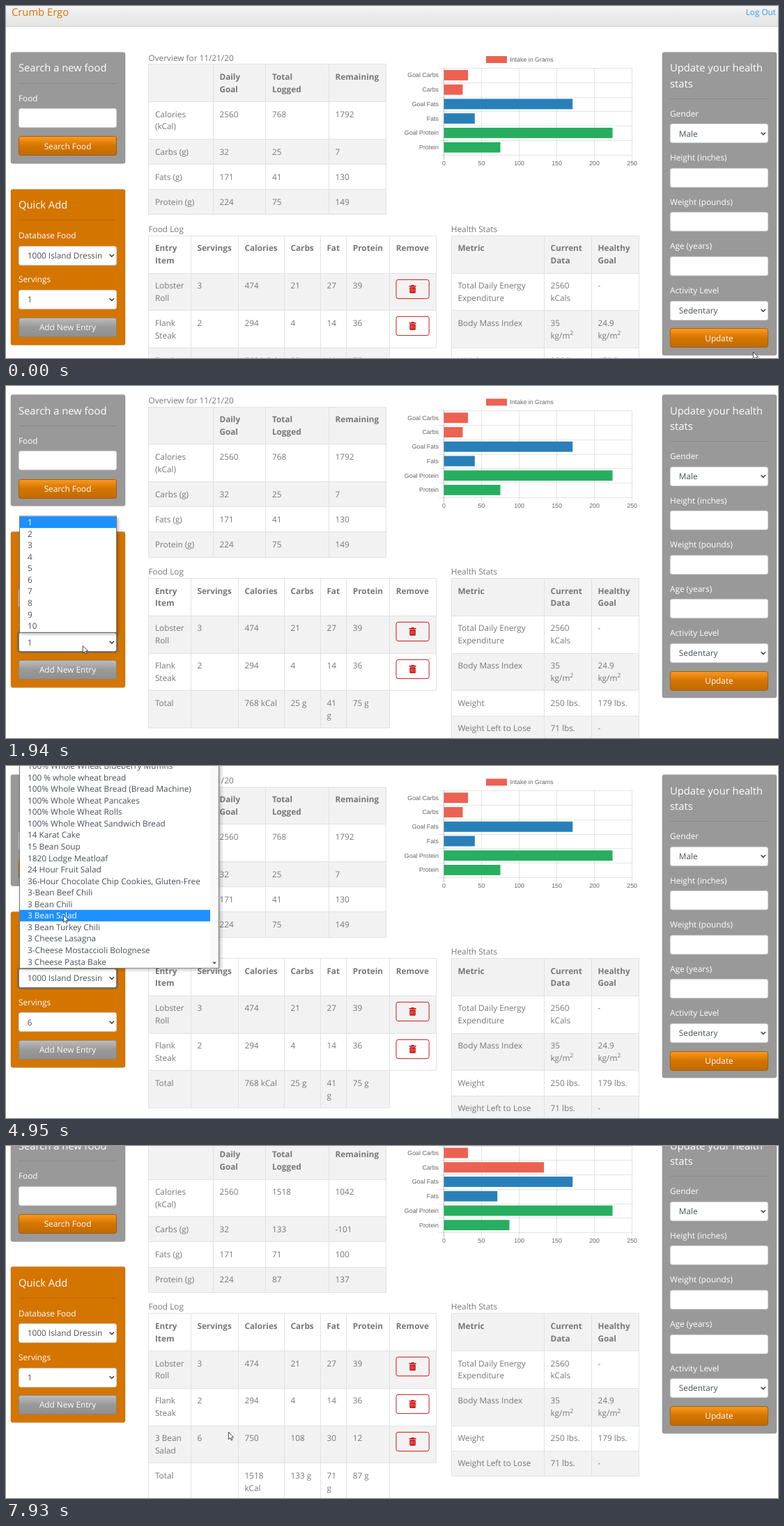
Write an HTML page with a canvas that moves like this. It is 1108 by 506 pixels and loops after 8 s.

```html
<!DOCTYPE html>
<html lang="en">
<head>
<meta charset="utf-8">
<title>Food log</title>
<style>
html, body { margin: 0; width: 100%; height: 100%; overflow: hidden; background: #fff; }
canvas { display: block; width: 1108px; height: 506px; }
</style>
</head>
<body>
<canvas id="stage"></canvas>
<script>
const W = 1108, H = 506, LOOP = 8000;
const canvas = document.getElementById('stage');
const dpr = window.devicePixelRatio || 1;
canvas.width = W * dpr;
canvas.height = H * dpr;
const ctx = canvas.getContext('2d', { alpha: false });

const SANS = '"Open Sans", sans-serif', ARIAL = '"Liberation Sans", Arial, sans-serif';
const BASE = 11.8, TITLE = 14.75, LINE = 17.7, ROW = 16.56;
const GRAY = '#999999', ORANGE = '#d47500', BODY = '#777', FIELD = '#495057';

// Moments of the story, in ms
const T = { servOpen: 1940, servPick: 2450, foodOpen: 3400, foodPick: 5180, add: 5780, load: 6900, grow: 6920 };

// Pointer path: time, x, y
const PATH = [
  [70, 1072, 497], [150, 1086, 500], [820, 142, 360], [900, 142, 360], [1140, 109, 370],
  [1600, 112, 384], [1830, 112, 384], [1920, 110, 374], [2290, 100, 280], [2440, 100, 280],
  [2770, 115, 422], [2910, 116, 434], [3000, 116, 434], [3350, 108, 308], [3450, 108, 308],
  [3690, 102, 288], [3780, 102, 288], [4010, 98, 238], [4320, 98, 238], [4390, 98, 224],
  [4560, 97, 222], [4710, 88, 200], [4880, 87, 201], [4950, 82, 214], [5180, 82, 214],
  [5590, 112, 385], [5740, 114, 404], [5820, 114, 404], [6290, 326, 425], [6520, 380, 405],
  [6590, 380, 405], [7320, 342, 316], [7390, 342, 315], [7500, 342, 315], [7930, 319, 411]
];

const FOODS = [
  '100% Whole Wheat Blueberry Muffins', '100 % whole wheat bread',
  '100% Whole Wheat Bread (Bread Machine)', '100% Whole Wheat Pancakes',
  '100% Whole Wheat Rolls', '100% Whole Wheat Sandwich Bread', '14 Karat Cake',
  '15 Bean Soup', '1820 Lodge Meatloaf', '24 Hour Fruit Salad',
  '36-Hour Chocolate Chip Cookies, Gluten-Free', '3-Bean Beef Chili', '3 Bean Chili',
  '3 Bean Salad', '3 Bean Turkey Chili', '3 Cheese Lasagna',
  '3-Cheese Mostaccioli Bolognese', '3 Cheese Pasta Bake'
];
const COUNTS = Array.from({ length: 10 }, (_, i) => String(i + 1));

let scroll = 0;

const clamp = (v) => Math.max(0, Math.min(1, v));
const smooth = (t, a, b) => { const k = clamp((t - a) / (b - a)); return k * k * (3 - 2 * k); };
const snap = (y) => Math.round(y - scroll) + scroll;

function pointer(t) {
  if (t <= PATH[0][0]) return PATH[0].slice(1);
  for (let i = 1; i < PATH.length; i++) {
    const [t0, x0, y0] = PATH[i - 1], [t1, x1, y1] = PATH[i];
    if (t <= t1) {
      const k = smooth(t, t0, t1);
      return [x0 + (x1 - x0) * k, y0 + (y1 - y0) * k];
    }
  }
  return PATH[PATH.length - 1].slice(1);
}

function scrollAt(t) {
  if (t < T.load) return 53.7 * smooth(t, 930, 1350);
  return 89.5 * smooth(t, 7470, 7930);
}

function text(s, x, y, color, size = BASE, weight = 400, align = 'left', family = SANS) {
  ctx.font = `${weight} ${size}px ${family}`;
  ctx.textAlign = align;
  ctx.fillStyle = color;
  ctx.fillText(s, x, y);
}

function rect(x, y, w, h, color) {
  ctx.fillStyle = color;
  ctx.fillRect(x, y, w, h);
}

function box(x, y, w, h, fill, border, r = 3) {
  y = snap(y);
  ctx.beginPath();
  ctx.roundRect(x + .4, y + .4, w - .8, h - .8, r);
  if (fill) { ctx.fillStyle = fill; ctx.fill(); }
  if (border) { ctx.strokeStyle = border; ctx.lineWidth = .9; ctx.stroke(); }
}

function ring(x, y, w, h, color) {
  ctx.beginPath();
  ctx.roundRect(x - 1, snap(y) - 1, w + 2, h + 2, 4);
  ctx.strokeStyle = color;
  ctx.lineWidth = 2.2;
  ctx.stroke();
}

function polyline(points, color, width) {
  ctx.beginPath();
  points.forEach(([x, y]) => ctx.lineTo(x, y));
  ctx.strokeStyle = color;
  ctx.lineWidth = width;
  ctx.stroke();
}

// ---- page parts ----

function header() {
  const g = ctx.createLinearGradient(0, -12, 0, 29);
  g.addColorStop(0, '#fff');
  g.addColorStop(.5, '#eee');
  g.addColorStop(1, '#e4e4e4');
  rect(0, -12, W, 41, g);
  rect(0, snap(29), W, 1, '#d5d5d5');
  text('Crumb Ergo', 8, 14.3, ORANGE, TITLE);
  text('Log Out', 1105, 13.2, '#3399f3', BASE, 400, 'right');
}

function card(x, y, h, color, titles) {
  box(x - 11.5, y, 165, h, color, 'rgba(0,0,0,.125)');
  titles.forEach((s, i) => text(s, x, y + 28.4 + i * 22.1, '#fff', TITLE));
  rect(x, snap(y + 44.6 + (titles.length - 1) * 22.1), 141, 1, 'rgba(0,0,0,.1)');
}

function field(label, x, y, value, focus) {
  text(label, x, y - 10.6, '#fff');
  box(x, y, 141, 28, '#fff', focus ? '#6f6f6f' : '#ced4da');
  if (focus) ring(x, y, 141, 28, 'rgba(68,90,115,.5)');
  if (!value) return;
  ctx.save();
  ctx.beginPath();
  ctx.rect(x, y, 119.8, 28);
  ctx.clip();
  text(value, x + 12.8, y + 18.3, FIELD);
  ctx.restore();
  const cy = y + 14;
  polyline([[x + 130.6, cy - 1.6], [x + 133.8, cy + 1.6], [x + 137, cy - 1.6]], '#333', 1.4);
}

function button(label, x, y, [top, mid, low, edge], focus) {
  const g = ctx.createLinearGradient(0, y, 0, y + 28);
  g.addColorStop(0, top);
  g.addColorStop(.5, mid);
  g.addColorStop(1, low);
  box(x, y, 141, 28, g, edge);
  if (focus) ring(x, y, 141, 28, 'rgba(153,153,153,.65)');
  text(label, x + 70.5, y + 18.3, '#fff', BASE, 400, 'center');
}
const HOT = ['#ff9b21', ORANGE, '#c06a00', '#a15900'];
const COOL = ['#bfbfbf', GRAY, '#8f8f8f', '#858585'];

function trash(x, y) {
  const red = '#cd0200', cx = x + 24, cy = snap(y) + 14;
  box(x, y, 48, 28, null, red);
  rect(cx - 2, cy - 5.9, 4, 1.2, red);
  rect(cx - 5, cy - 5, 10, 1.5, red);
  ctx.beginPath();
  ctx.roundRect(cx - 4.2, cy - 2.8, 8.4, 8.6, 1);
  ctx.fillStyle = red;
  ctx.fill();
  for (const dx of [-2.3, 0, 2.3]) rect(cx + dx - .35, cy - 1.4, .7, 5.6, '#f4c9c8');
}

function table(xs, y, rows, shaded) {
  const line = '#dfe2e5';
  rows.forEach((cells, r) => {
    const lines = Math.max(...cells.map((c) => c.split('\n').length));
    const h = lines > 1 ? 53.8 : 36.1;
    const top = snap(y), bottom = snap(y + h), right = xs[cells.length];
    if (r % 2 === shaded) rect(xs[0], top, right - xs[0], bottom - top, '#f2f2f2');
    rect(xs[0], top, right - xs[0], 1, line);
    rect(xs[0], bottom, right - xs[0] + 1, 1, line);
    for (let i = 0; i <= cells.length; i++) rect(Math.round(xs[i] - .4), top, 1, bottom - top, line);
    cells.forEach((cell, i) => {
      const x = xs[i] + 9.4;
      if (cell === 'trash') return trash(x - .2, y + 9);
      cell.split('\n').forEach((s, n) => {
        const [main, sup] = s.split('^');
        const by = y + 22.6 + n * LINE;
        text(main, x, by, BODY, BASE, r ? 400 : 700);
        if (sup) text(sup, x + ctx.measureText(main).width, by - 4.5, BODY, 8.85);
      });
    });
    y += h;
  });
}

function chart(values, grow) {
  const x0 = 628.5, y0 = 89, unit = 1.0804, step = 20.75;
  const names = ['Goal Carbs', 'Carbs', 'Goal Fats', 'Fats', 'Goal Protein', 'Protein'];
  const colors = ['#eb6252', '#2980b9', '#27ae60'];
  const grid = 'rgba(0,0,0,.1)';
  rect(689, 72, 30, 10, colors[0]);
  text('Intake in Grams', 723.2, 80, '#666', 8.85, 400, 'left', ARIAL);
  for (let i = 0; i <= 6; i++) rect(621, snap(y0 + i * step), 278, 1, grid);
  for (let i = 0; i <= 5; i++) {
    const x = x0 + i * 50 * unit;
    rect(Math.round(x - .5), y0, 1, 132, i ? grid : 'rgba(0,0,0,.25)');
    text(String(i * 50), x, 228.8, '#666', 8.85, 400, 'center', ARIAL);
  }
  names.forEach((s, i) => {
    const cy = y0 + (i + .5) * step;
    text(s, 621, cy + 3, '#666', 8.85, 400, 'right', ARIAL);
    rect(x0, cy - 7.4, values[i] * unit * grow, 14.9, colors[i >> 1]);
  });
}

function page(t) {
  const fresh = t >= T.load;
  header();

  card(18, 66, 161, GRAY, ['Search a new food']);
  field('Food', 18, 147.2);
  button('Search Food', 18, 187.2, HOT);

  const food = !fresh && t >= T.foodPick ? '3 Bean Salad' : '1000 Island Dressing';
  const count = !fresh && t >= T.servPick ? '6' : '1';
  card(18, 262.6, 225, ORANGE, ['Quick Add']);
  field('Database Food', 18, 344.6, food, t >= T.foodOpen - 20 && t < T.add);
  field('Servings', 18, 408, count, t >= T.servOpen - 10 && t < T.foodOpen - 20);
  button('Add New Entry', 18, 447.6, COOL, t >= T.add && !fresh);

  card(953, 66, 436.6, GRAY, ['Update your health', 'stats']);
  field('Gender', 953, 169.3, 'Male');
  field('Height (inches)', 953, 232.9);
  field('Weight (pounds)', 953, 296.4);
  field('Age (years)', 953, 360);
  field('Activity Level', 953, 423.6, 'Sedentary');
  button('Update', 953, 463.3, HOT);

  const sums = fresh
    ? [['1518', '1042'], ['133', '-101'], ['71', '100'], ['87', '137']]
    : [['768', '1792'], ['25', '7'], ['41', '130'], ['75', '149']];
  text('Overview for 11/21/20', 204.5, 78.7, BODY);
  table([204.5, 297, 372.5, 463, 545], 83.3, [
    ['', 'Daily\nGoal', 'Total\nLogged', 'Remaining'],
    ['Calories\n(kCal)', '2560', ...sums[0]],
    ['Carbs (g)', '32', ...sums[1]],
    ['Fats (g)', '171', ...sums[2]],
    ['Protein (g)', '224', ...sums[3]]
  ], 0);

  const log = [
    ['Entry\nItem', 'Servings', 'Calories', 'Carbs', 'Fat', 'Protein', 'Remove'],
    ['Lobster\nRoll', '3', '474', '21', '27', '39', 'trash'],
    ['Flank\nSteak', '2', '294', '4', '14', '36', 'trash']
  ];
  if (fresh) {
    log.push(['3 Bean\nSalad', '6', '750', '108', '30', '12', 'trash'],
      ['Total', '', '1518\nkCal', '133 g', '71\ng', '87 g']);
  } else {
    log.push(['Total', '', '768 kCal', '25 g', '41\ng', '75 g']);
  }
  text('Food Log', 204.5, 324.7, BODY);
  table([204.5, 265, 333, 399, 451, 488.4, 550.4, 617], 329.7, log, 1);

  text('Health Stats', 638.8, 324.7, BODY);
  table([639, 772, 840, 908], 329.7, [
    ['Metric', 'Current\nData', 'Healthy\nGoal'],
    ['Total Daily Energy\nExpenditure', '2560\nkCals', '-'],
    ['Body Mass Index', '35\nkg/m^2', '24.9\nkg/m^2'],
    ['Weight', '250 lbs.', '179 lbs.'],
    ['Weight Left to Lose', '71 lbs.', '-']
  ], 0);

  const grow = fresh ? 1 - Math.pow(1 - clamp((t - T.grow) / 1000), 4) : 1;
  chart(fresh ? [32, 133, 171, 71, 224, 87] : [32, 25, 171, 41, 224, 75], grow);
}

// ---- overlays ----

function dropdown(items, y, width, inner, cy, chosen) {
  const h = items.length * ROW;
  ctx.save();
  ctx.shadowColor = 'rgba(0,0,0,.3)';
  ctx.shadowBlur = 5;
  ctx.shadowOffsetX = ctx.shadowOffsetY = 2;
  rect(19, y - 1, width, h + 2.4, '#767676');
  ctx.restore();
  rect(20, y, width - 2, h + .6, '#fff');
  const over = Math.floor((cy - y) / ROW);
  const active = over >= 0 && over < items.length ? over : chosen;
  items.forEach((s, i) => {
    const top = y + i * ROW;
    if (i === active) rect(20, top, inner, ROW, '#1e90ff');
    text(s, 31, top + 12.5, i === active ? '#fff' : FIELD);
  });
}

function foodList(cy) {
  dropdown(FOODS, 206.8 - 13 * ROW, 287, 273, cy, -1);
  rect(293, 0, 12, 290, '#fafafa');
  ctx.beginPath();
  ctx.moveTo(296.4, 281.8);
  ctx.lineTo(301.8, 281.8);
  ctx.lineTo(299.1, 285);
  ctx.fillStyle = '#505050';
  ctx.fill();
}

function statusBar(t) {
  const a = smooth(t, 5930, 6050) * (1 - smooth(t, 7240, 7400));
  if (!a) return;
  ctx.globalAlpha = a;
  ctx.beginPath();
  ctx.roundRect(-4, 504, 376, 10, 2);
  ctx.fillStyle = '#0c0c0c';
  ctx.fill();
  ctx.globalAlpha = 1;
}

function arrow(x, y) {
  const shape = [[0, 0], [0, 10.3], [2.4, 8.2], [4, 11.7], [5.6, 11], [4.1, 7.6], [7.2, 7.3]];
  ctx.beginPath();
  shape.forEach(([dx, dy]) => ctx.lineTo(x + .4 + dx, y + .4 + dy));
  ctx.closePath();
  ctx.fillStyle = '#fff';
  ctx.fill();
  ctx.strokeStyle = '#2b2b2b';
  ctx.lineWidth = .85;
  ctx.stroke();
}

function draw(t) {
  ctx.setTransform(dpr, 0, 0, dpr, 0, 0);
  ctx.textRendering = 'geometricPrecision';
  rect(0, 0, W, H, '#fff');
  scroll = scrollAt(t);
  ctx.save();
  ctx.translate(0, -scroll);
  page(t);
  ctx.restore();
  const [x, y] = pointer(t);
  if (t >= T.servOpen && t < T.servPick) dropdown(COUNTS, 187.6, 140, 138, y, 0);
  if (t >= T.foodOpen && t < T.foodPick) foodList(y);
  statusBar(t);
  arrow(x, y);
}

const start = performance.now();
function tick() {
  draw((performance.now() - start) % LOOP);
  requestAnimationFrame(tick);
}
tick();
</script>
</body>
</html>
```
